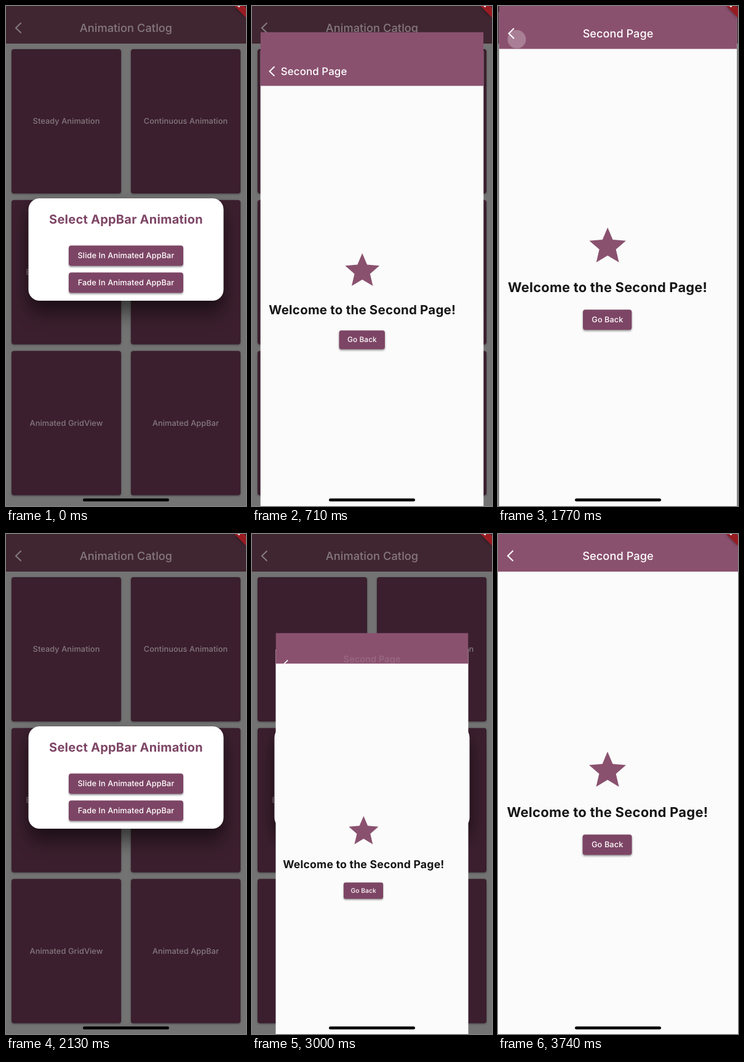
An HTML page that plays this animation: 390x811 px, repeating every 3760 ms.

```html
<!DOCTYPE html>
<html lang="en">
<head>
<meta charset="utf-8">
<title>AppBar animation</title>
<style>
  html, body { margin: 0; height: 100%; overflow: hidden; background: #737373; }
  svg { display: block; }
  text { font: 500 12.75px Inter, sans-serif; letter-spacing: .09px; text-anchor: middle; text-rendering: geometricPrecision; }
  .title { font-size: 18.2px; letter-spacing: .08px; }
  .bold { font-weight: 700; letter-spacing: .25px; }
  .tile { fill: #3b1f2e; filter: drop-shadow(0 1.5px 1.5px #0006); }
  .button { fill: #7d4565; filter: drop-shadow(0 2px 1.5px #0006); }
  .dialog { fill: #fff; filter: drop-shadow(0 20px 14px #0006) drop-shadow(0 6px 8px #0003); }
  .banner { fill: #981b22; filter: drop-shadow(0 0 2.5px #0008); }
  .chevron { fill: none; stroke-width: 2.1; }
</style>
</head>
<body>
<svg id="stage" width="390" height="811" viewBox="0 0 390 811">
  <rect width="390" height="811" fill="#737373"/>
  <rect width="390" height="61" fill="#402631"/>
  <path class="chevron" stroke="#857a80" d="M24.5 27.2 16 35.5l8.5 8.3"/>
  <g id="tiles" fill="#85787f">
    <text class="title" x="195" y="42">Animation Catlog</text>
  </g>

  <rect class="dialog" x="36.5" y="312" width="317" height="166" rx="18"/>
  <text class="bold" x="195" y="353" fill="#7d4565" style="font-size:20px">Select AppBar Animation</text>
  <rect class="button" x="102" y="388.5" width="186" height="33" rx="4"/>
  <rect class="button" x="102" y="432.3" width="186" height="33" rx="4"/>
  <g fill="#fff">
    <text x="195" y="409.3">Slide In Animated AppBar</text>
    <text x="195" y="453">Fade In Animated AppBar</text>
  </g>

  <g id="page">
    <rect width="390" height="811" fill="#fafbfa"/>
    <g id="body">
      <path fill="#8a516f" transform="translate(142 347) scale(3)"
        d="M12 17.27 18.18 21l-1.64-7.03L22 9.24l-7.19-.61L12 2 9.19 8.63 2 9.24l5.46 4.73L5.82 21z"/>
      <text class="bold" x="178" y="459" fill="#151515" style="font-size:22px">Welcome to the Second Page!</text>
      <rect class="button" x="137.5" y="487.5" width="80" height="33" rx="4"/>
      <text x="177.7" y="508.3" fill="#fff">Go Back</text>
    </g>
    <svg id="bar" y="-33" width="390" height="94" overflow="hidden">
      <rect width="390" height="94" fill="#8a516f"/>
      <circle id="touch" cx="29" cy="78" r="15" fill="#fff"/>
      <path id="back" class="chevron" stroke="#fff" d="M24.5-8.3 16 0l8.5 8.3"/>
      <text id="heading" class="title" fill="#fff">Second Page</text>
    </svg>
  </g>

  <path class="banner" d="M371 0 390 19V3L387 0z"/>
  <path fill="#fff" d="M375.5 0h5l-1.5 2.2z"/>
  <rect x="125" y="798.8" width="140" height="4.8" rx="2.4"/>
</svg>
<script>
const LOOP = 3760, ROUTE = 400, BAR = 1000;
const STATUS = 42.8, TOOLBAR = 51.2;
const $ = id => document.getElementById(id);
const clamp = v => Math.min(1, Math.max(0, v));

function bezier(x1, y1, x2, y2) {
  const at = (a, b, u) => 3 * a * u * (1 - u) ** 2 + 3 * b * u * u * (1 - u) + u ** 3;
  return x => {
    if (x <= 0 || x >= 1) return clamp(x);
    let lo = 0, hi = 1;
    for (let i = 0; i < 24; i++) {
      const mid = (lo + hi) / 2;
      if (at(x1, x2, mid) < x) lo = mid; else hi = mid;
    }
    return at(y1, y2, lo);
  };
}
const fastOutSlowIn = bezier(.4, 0, .2, 1);
const easeInOut = bezier(.42, 0, .58, 1);
const easeOut = bezier(0, 0, .58, 1);

const labels = ["Steady Animation", "Continuous Animation", "E", "", "Animated GridView", "Animated AppBar"];
$("tiles").innerHTML += labels.map((label, i) => {
  const x = 9 + i % 2 * 194, y = 70 + (i >> 1) * 244.8;
  const center = label === "E" ? 36.5 : x + 89;
  return `<rect class="tile" x="${x}" y="${y}" width="178" height="234" rx="4"/>
    <text x="${center}" y="${y + 121}">${label}</text>`;
}).join("");

function draw(t) {
  const second = t >= 2500;
  const progress = second ? (t - 2792) / ROUTE
    : t < 1722 ? (t - 438) / ROUTE : 1 - (t - 1722) / ROUTE;
  const scale = fastOutSlowIn(progress);
  $("page").style.display = scale > 0 ? "" : "none";
  const lift = 695 * scale * (1 - scale);
  $("page").setAttribute("transform",
    `translate(195 ${389 + lift}) scale(${scale}) translate(-195 -389)`);

  // The first visit slides the heading in; the second grows the bar and fades it.
  const grow = second ? easeOut((t - 2755) / BAR) : 1;
  const slide = second ? 1 : easeInOut((t - 458) / BAR);
  const toolbar = TOOLBAR * grow;
  $("bar").setAttribute("height", STATUS + toolbar);
  $("body").setAttribute("transform", `translate(0 ${(toolbar - TOOLBAR) / 2})`);
  $("back").setAttribute("transform", `translate(0 ${STATUS + Math.max(toolbar / 2, 20.5)})`);
  $("heading").setAttribute("x", 195 - 117 * (1 - slide));
  $("heading").setAttribute("y", STATUS + toolbar / 2 + 6.6);
  $("heading").setAttribute("opacity", grow ** 2);
  $("touch").setAttribute("opacity", t < 1740 ? 0 : .27 * clamp((1950 - t) / 180));
}

const start = performance.now();
function tick() {
  draw((performance.now() - start) % LOOP);
  requestAnimationFrame(tick);
}
tick();
</script>
</body>
</html>
```
